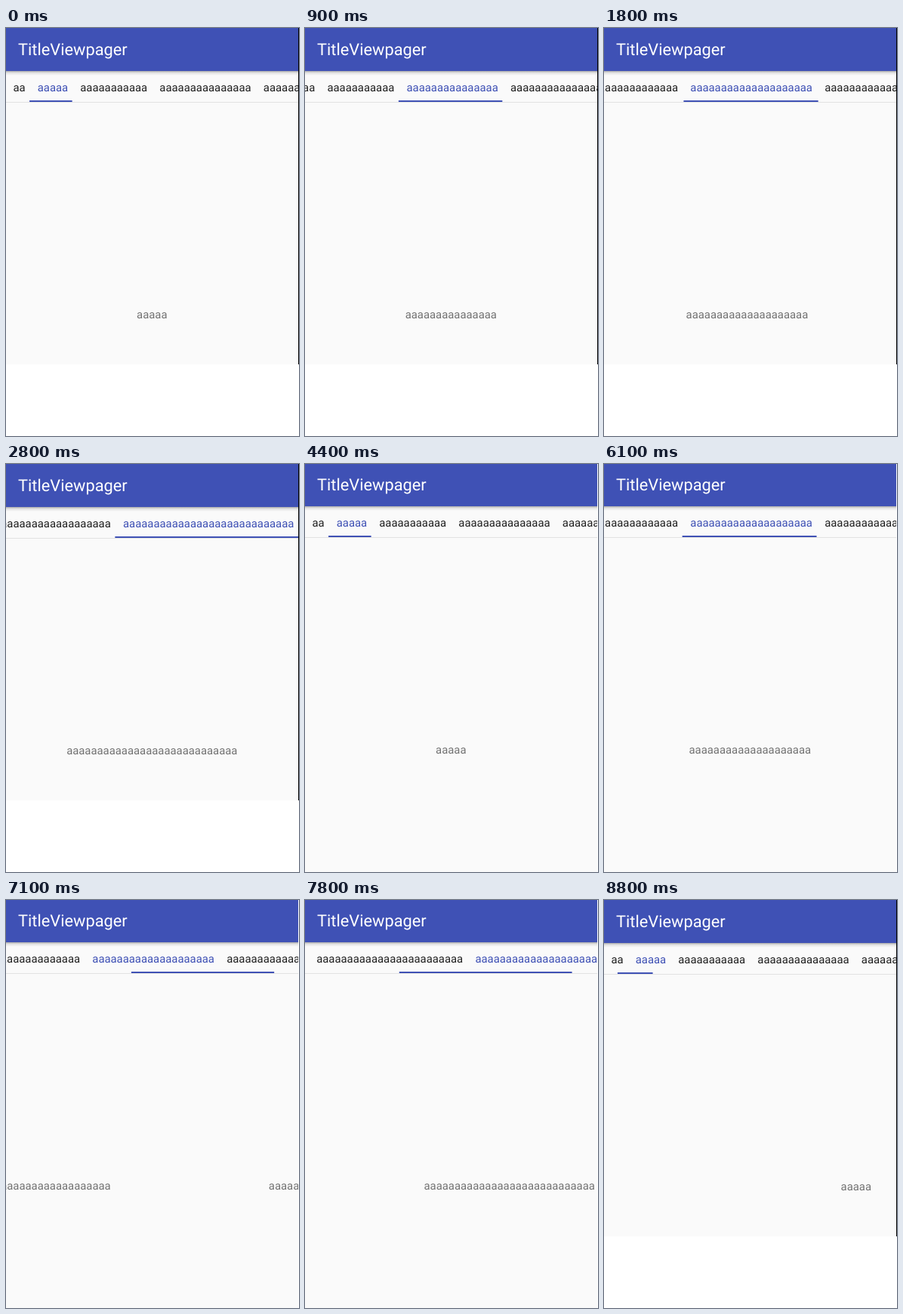
Write an HTML page that moves like this. It is 388x541 px and loops after 9 s.

```html
<!DOCTYPE html>
<html lang="en">
<head>
<meta charset="utf-8">
<title>TitleViewpager</title>
<style>
  html, body { margin: 0; width: 100%; height: 100%; overflow: hidden; background: #fff; }
  svg { display: block; width: 388px; height: 541px; }
  text { font: 14.87px Roboto, sans-serif; text-rendering: geometricPrecision; white-space: pre; }
  .title { font-size: 21.8px; fill: #fff; }
  .page { fill: #737373; text-anchor: middle; }
</style>
</head>
<body>
<svg viewBox="0 0 388 541">
  <defs>
    <linearGradient id="shade" x2="0" y2="1">
      <stop offset="0" stop-color="#000" stop-opacity=".32"/>
      <stop offset=".4" stop-color="#000" stop-opacity=".1"/>
      <stop offset="1" stop-color="#000" stop-opacity="0"/>
    </linearGradient>
    <clipPath id="screen"><rect width="387" height="542"/></clipPath>
  </defs>
  <rect id="back" width="387" fill="#fafafa"/>
  <g clip-path="url(#screen)">
    <g id="app">
      <rect y="-1" width="387" height="58" fill="#3f51b5"/>
      <rect y="57" width="387" height="6" fill="url(#shade)"/>
      <text class="title" x="16" y="36">TitleViewpager</text>
      <rect y="98" width="387" height="1" fill="#e2e2e2"/>
      <g id="strip"><rect id="marker" y="96" height="2" fill="#3f51b5"/></g>
      <g id="pages"></g>
    </g>
  </g>
  <rect id="edge" x="387" width="1" height="446" fill="#000"/>
</svg>
<script>
const LOOP = 9000, STEP = 100, PAGE_WIDTH = 387, CENTER = 193.3;
const CHAR = 8.09, PAD = 8.05, MARKER_SHIFT = -2.6;
const $ = id => document.getElementById(id);

function addText(parent, string, attrs) {
  const el = document.createElementNS('http://www.w3.org/2000/svg', 'text');
  el.textContent = string;
  for (const key in attrs) el.setAttribute(key, attrs[key]);
  return parent.appendChild(el);
}

let nextX = 1.4;
const tabs = [2, 5, 11, 15, 20, 24, 28].map(count => {
  const x = nextX, width = count * CHAR + 2 * PAD, label = 'a'.repeat(count);
  nextX += width;
  return {
    x, width,
    title: addText($('strip'), label, { x: x + PAD, y: 83.8 }),
    page: addText($('pages'), label, { class: 'page', y: 385 })
  };
});
const maxScroll = nextX + MARKER_SHIFT - PAGE_WIDTH;
for (const tab of tabs) {
  const centered = tab.x + MARKER_SHIFT + tab.width / 2 - 192.6;
  tab.scroll = Math.max(0, Math.min(maxScroll, centered));
}

// Page offset at each screen refresh of a swipe
const quick = [.35, .88, 1];
const flick = [.2, .8, .97, 1];
const swipe = [.01, .25, .75, .96, 1];
const slow = [.02, .08, .18, .35, .8, 1];
const bounce = [.12, .42, .15, 0];
const drag = [0, .03, .12, .3, .52, .637];

// [start, page, offsets]
const moves = [
  [0, 1, [0]], [100, 1, flick], [700, 2, quick], [1200, 3, swipe], [1800, 4, swipe], [2500, 5, flick],
  [3400, 0, [0]], [3900, 0, slow], [4600, 1, swipe], [5200, 2, swipe], [5800, 3, flick],
  [6400, 4, bounce], [7100, 4, quick], [7700, 5, flick], [8300, 0, drag]
];

const mix = (a, b, k) => a + (b - a) * k;

function draw(ms) {
  const [start, index, offsets] = moves.findLast(move => move[0] <= ms);
  const step = Math.min(Math.floor((ms - start) / STEP), offsets.length - 1);
  const offset = offsets[step];
  const chosen = offset > .5;
  // The tab strip trails the page while it settles
  const trail = chosen && offset < 1 ? mix(offsets[step - 1] || 0, offset, .62) : offset;
  const from = tabs[index], to = tabs[Math.min(index + 1, tabs.length - 1)];
  const scroll = mix(from.scroll, to.scroll, chosen ? trail ** 1.1 : 0);
  const selected = chosen ? to : from;

  $('strip').setAttribute('transform', `translate(${-scroll})`);
  $('marker').setAttribute('x', mix(from.x, to.x, trail) + MARKER_SHIFT);
  $('marker').setAttribute('width', mix(from.width, to.width, trail));
  tabs.forEach((tab, i) => {
    tab.title.setAttribute('fill', tab === selected ? '#3f51b5' : '#212121');
    tab.page.setAttribute('x', CENTER + (i - index - offset) * PAGE_WIDTH);
  });

  const tall = ms >= 3400 && ms < 8300;
  $('app').setAttribute('transform', `translate(0 ${tall ? -1 : 0})`);
  $('back').setAttribute('height', tall ? 541 : 446);
  $('edge').style.display = tall ? 'none' : '';
}

const began = performance.now();
function frame() {
  draw((performance.now() - began) % LOOP);
  requestAnimationFrame(frame);
}
frame();
</script>
</body>
</html>
```
